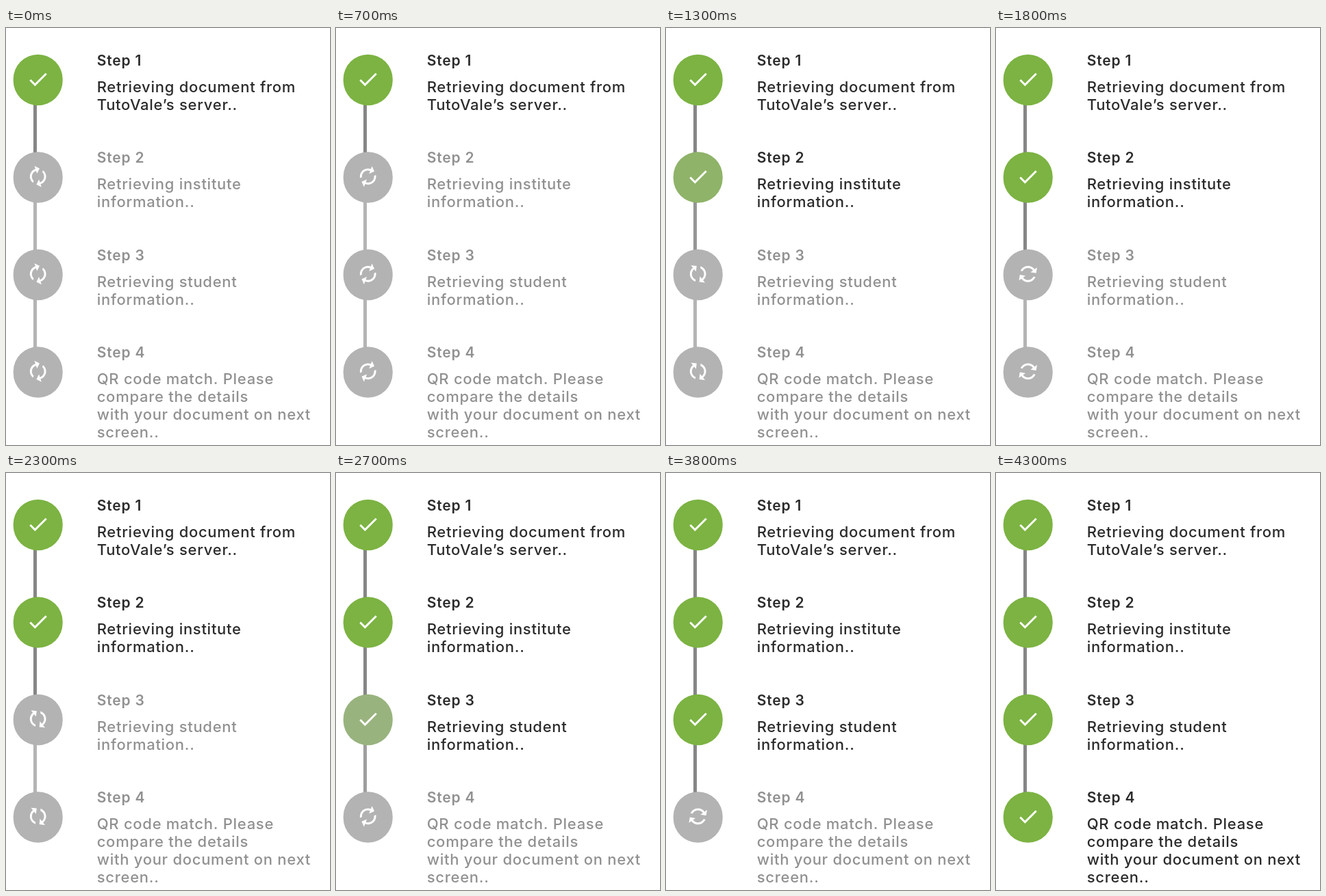
Animation of 473x610 px, one loop 5.2 s. Source, as an HTML page with a canvas:

```html
<!DOCTYPE html>
<html lang="en">
<head>
<meta charset="utf-8">
<title>Verification steps</title>
<style>
  html, body { margin: 0; width: 100%; height: 100%; overflow: hidden; background: #fff; }
  canvas { display: block; width: 473px; height: 610px; }
</style>
</head>
<body>
<canvas id="stage"></canvas>
<script>
const W = 473, H = 610;
const LOOP = 5200, TICK = 100, LAST_CHANGE = 4300;
const FADE = 250, SPIN = 1000, SPIN_OFFSET = 470;
const TOP = 76, GAP = 142.5;

const GRAY = [179, 179, 179], GREEN = [124, 179, 66];
const LINE_IDLE = [180, 180, 180], LINE_DONE = [134, 134, 134];
const TEXT_IDLE = '#919191', TEXT_DONE = '#2b2b2b';

const steps = [
  { start: -220, lines: ['Retrieving document from', 'TutoVale’s server..'] },
  { start: 1205, lines: ['Retrieving institute', 'information..'] },
  { start: 2630, lines: ['Retrieving student', 'information..'] },
  { start: 4055, lines: ['QR code match. Please', 'compare the details',
                          'with your document on next', 'screen..'] }
];

// Icons on a 24-unit grid
const check = new Path2D('M9 16.17 4.83 12 3.41 13.41 9 19 21 7 19.59 5.59z');
const renew = new Path2D(
  'M12 6v3l4-4-4-4v3c-4.42 0-8 3.58-8 8 0 1.57.46 3.03 1.24 4.26L6.7 14.8' +
  'c-.45-.83-.7-1.79-.7-2.8 0-3.31 2.69-6 6-6z' +
  'M18.76 7.74 17.3 9.2c.44.84.7 1.79.7 2.8 0 3.31-2.69 6-6 6v-3l-4 4 4 4v-3' +
  'c4.42 0 8-3.58 8-8 0-1.57-.46-3.03-1.24-4.26z');

const canvas = document.getElementById('stage');
const ctx = canvas.getContext('2d');
const ratio = window.devicePixelRatio || 1;
canvas.width = Math.round(W * ratio);
canvas.height = Math.round(H * ratio);

// Cubic Bézier timing function, solved by bisection
function bezier(x1, y1, x2, y2) {
  const at = (a, b, s) => 3 * a * s * (1 - s) ** 2 + 3 * b * s * s * (1 - s) + s ** 3;
  return x => {
    if (x <= 0) return 0;
    if (x >= 1) return 1;
    let lo = 0, hi = 1;
    for (let i = 0; i < 24; i++) {
      const mid = (lo + hi) / 2;
      if (at(x1, x2, mid) < x) lo = mid; else hi = mid;
    }
    return at(y1, y2, lo);
  };
}
const ease = bezier(0.25, 0.1, 0.25, 1);
const easeInOut = bezier(0.42, 0, 0.58, 1);

const mix = (a, b, p) => `rgb(${a.map((v, i) => Math.round(v + (b[i] - v) * p)).join(',')})`;

function drawText(text, y, weight, size, spacing) {
  ctx.font = `${weight} ${size}px Inter, "Open Sans", sans-serif`;
  ctx.letterSpacing = spacing + 'px';
  ctx.fillText(text, 132.7, y);
}

function drawIcon(path, y, angle, scale) {
  ctx.save();
  ctx.translate(46.7, y);
  ctx.rotate(angle);
  ctx.scale(scale, scale);
  ctx.translate(-12, -12);
  ctx.fillStyle = '#fff';
  ctx.fill(path);
  ctx.restore();
}

function drawStep(step, i, t) {
  const y = TOP + i * GAP;
  const done = t >= step.start;
  const p = ease((t - step.start) / FADE);

  if (i < steps.length - 1) {
    ctx.fillStyle = mix(LINE_IDLE, LINE_DONE, p);
    ctx.fillRect(40, y + 30, 5, GAP - 60);
  }
  ctx.fillStyle = mix(GRAY, GREEN, p);
  ctx.beginPath();
  ctx.roundRect(10.7, y - 37.3, 72, 74.6, 36);
  ctx.fill();

  const turn = easeInOut(((t + SPIN_OFFSET) % SPIN) / SPIN);
  if (done) drawIcon(check, y - 1, 0, 1.45);
  else drawIcon(renew, y - 1.2, turn * 2 * Math.PI, 1.48);

  ctx.fillStyle = done ? TEXT_DONE : TEXT_IDLE;
  drawText(`Step ${i + 1}`, y - 21.3, 600, 21, 0.8);
  step.lines.forEach((line, n) => drawText(line, y + 17.6 + n * 26, 450, 22, 0.72));
}

function draw(now) {
  const t = Math.min(Math.floor((now % LOOP) / TICK) * TICK, LAST_CHANGE);
  ctx.setTransform(ratio, 0, 0, ratio, 0, 0);
  ctx.fillStyle = '#fff';
  ctx.fillRect(0, 0, W, H);
  steps.forEach((step, i) => drawStep(step, i, t));
}

const origin = performance.now();
function frame() {
  draw(performance.now() - origin);
  requestAnimationFrame(frame);
}
frame();
</script>
</body>
</html>
```
